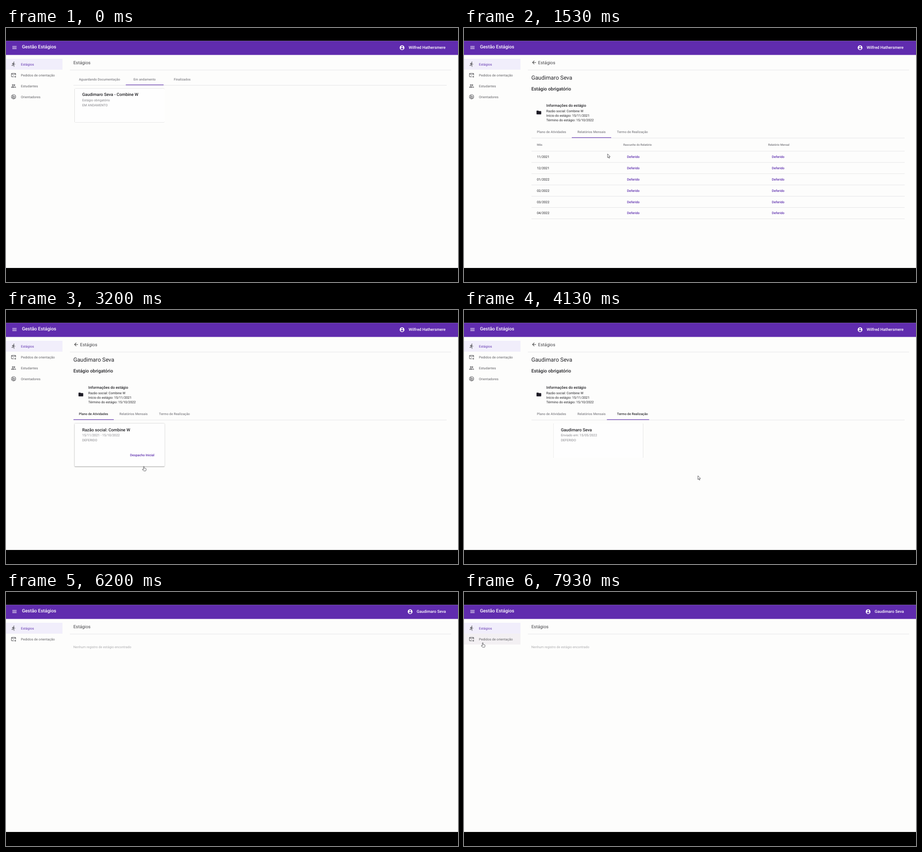
An HTML page that plays this animation: 998x561 px, repeating every 8 s.

```html
<!DOCTYPE html>
<html lang="pt">
<head>
<meta charset="utf-8">
<title>Gestão Estágios</title>
<style>
html, body { margin: 0; width: 100%; height: 100%; overflow: hidden; background: #000; }
svg { display: block; width: 100vw; height: 100vh; }
text { font-family: Roboto, sans-serif; text-rendering: geometricPrecision; white-space: pre; }
.card { fill: #fefefe; filter: drop-shadow(0 .7px .4px rgba(0,0,0,.34)) drop-shadow(0 .3px .7px rgba(0,0,0,.14)); }
.card.hover { filter: drop-shadow(0 1px .7px rgba(0,0,0,.28)) drop-shadow(0 .5px 1.6px rgba(0,0,0,.24)); }
</style>
</head>
<body>
<svg id="stage" viewBox="0 0 998 561" preserveAspectRatio="none"></svg>
<script>
const PURPLE = '#5e2fae', DARK = '#222226', GREY = '#85858a', LINE = '#dfdfe2';
const STUDENT = 'Gaudimaro Seva', COMPANY = 'Combine W';
const LEFT = 149, WIDTH = 824;

const icons = {
  menu: 'M3 18h18v-2H3v2zm0-5h18v-2H3v2zm0-7v2h18V6H3z',
  user: 'M12 2C6.48 2 2 6.48 2 12s4.48 10 10 10 10-4.48 10-10S17.52 2 12 2zm0 3c1.66 0 3 1.34 3 3s-1.34 3-3 3-3-1.34-3-3 1.34-3 3-3zm0 14.2c-2.5 0-4.71-1.28-6-3.22.03-1.99 4-3.08 6-3.08 1.99 0 5.97 1.09 6 3.08-1.29 1.94-3.5 3.22-6 3.22z',
  run: 'M13.49 5.48c1.1 0 2-.9 2-2s-.9-2-2-2-2 .9-2 2 .9 2 2 2zm-3.6 13.9l1-4.4 2.1 2v6h2v-7.5l-2.1-2 .6-3c1.3 1.5 3.3 2.5 5.5 2.5v-2c-1.9 0-3.5-1-4.3-2.4l-1-1.6c-.4-.6-1-1-1.7-1-.3 0-.5.1-.8.1l-5.2 2.2v4.7h2v-3.4l1.8-.7-1.6 8.1-4.9-1-.4 2 7 1.4z',
  inbox: 'M20 4H4c-1.1 0-2 .9-2 2v12c0 1.1.9 2 2 2h9v-2H4V8l8 5 8-5v5h2V6c0-1.1-.9-2-2-2zm-8 7L4 6h16l-8 5zm7 4l4 4-4 4v-3h-4v-2h4v-3z',
  people: 'M9 13.75c-2.34 0-7 1.17-7 3.5V19h14v-1.75c0-2.33-4.66-3.5-7-3.5zM4.34 17c.84-.58 2.87-1.25 4.66-1.25s3.82.67 4.66 1.25H4.34zM9 12c1.93 0 3.5-1.57 3.5-3.5S10.93 5 9 5 5.5 6.57 5.5 8.5 7.07 12 9 12zm0-5c.83 0 1.5.67 1.5 1.5S9.83 10 9 10s-1.5-.67-1.5-1.5S8.17 7 9 7zm7.04 6.81c1.16.84 1.96 1.96 1.96 3.44V19h4v-1.75c0-2.02-3.5-3.17-5.96-3.44zM15 12c1.93 0 3.5-1.57 3.5-3.5S16.93 5 15 5c-.54 0-1.04.13-1.5.35.63.89 1 1.98 1 3.15s-.37 2.26-1 3.15c.46.22.96.35 1.5.35z',
  back: 'M20 11H7.83l5.59-5.59L12 4l-8 8 8 8 1.41-1.41L7.83 13H20v-2z',
  folder: 'M10 4H4c-1.1 0-2 .9-2 2v12c0 1.1.9 2 2 2h16c1.1 0 2-.9 2-2V8c0-1.1-.9-2-2-2h-8l-2-2z'
};

const text = (x, y, s, { size = 7.28, fill = DARK, bold = false, more = '' } = {}) =>
  `<text x="${x}" y="${y}" font-size="${size}" fill="${fill}" font-weight="${bold ? 500 : 400}" ${more}>${s}</text>`;
const rect = (x, y, w, h, fill, more = '') =>
  `<rect x="${x}" y="${y}" width="${w}" height="${h}" fill="${fill}" ${more}/>`;
const rule = (y, x = LEFT, w = WIDTH) => rect(x, y - .4, w, .8, LINE);
const icon = (name, cx, cy, fill) =>
  `<path d="${icons[name]}" fill="${fill}" transform="translate(${cx - 6.24} ${cy - 6.24}) scale(.52)"/>`;
const group = (id, body, more = '') => `<g id="${id}" ${more}>${body}</g>`;
const tab = (x, y, s, id) => text(x, y, s, { bold: true, fill: GREY, more: `id="${id}"` });
const card = (id, y, h, title, lines) =>
  `<rect id="${id}" class="card" x="151.5" y="${y}" width="198.5" height="${h}" rx="1.5"/>` +
  text(168.2, y + 16.7, title, { size: 9.36, bold: true }) +
  lines.map((s, i) => text(168.2, y + 28.4 + i * 10.4, s, { fill: GREY })).join('');
const sideItem = (i, s, on) =>
  text(33, 82.6 + 24 * i, s, { fill: on ? PURPLE : '#5c5c60', more: 'letter-spacing=".12"' });
const heading = (x, s) => text(x, 79.6, s, { size: 9.9, fill: '#444448' });
const account = (id, x, name) =>
  group(id, icon('user', x - 14.5, 43.5, '#fff') + text(x, 46, name, { size: 8.8, fill: '#fff', bold: true }));

const supervisor = `<g transform="translate(10.5 145.6) scale(.52)" fill="none" stroke="#5c5c60" stroke-width="2">
  <circle cx="12" cy="12" r="9.2"/><circle cx="9.6" cy="9.6" r="2.4"/>
  <path d="M4.6 16.6q5-3.6 8.2-1.2M12 21v-3.4q2.4-2.6 6.6-1"/><circle cx="16" cy="11.2" r="1.2"/></g>`;

const months = ['11/2021', '12/2021', '01/2022', '02/2022', '03/2022', '04/2022'];
const th = (x, s) => text(x, 260, s, { size: 6.24, fill: '#77777c', bold: true });
const table = th(161, 'Mês') + th(351.7, 'Rascunho do Relatório') + th(671.5, 'Relatório Mensal') + rule(272) +
  months.map((m, i) => {
    const y = 286.8 + 24.93 * i, link = x => text(x, y, 'Deferido', { fill: PURPLE, bold: true });
    return text(161, y, m) + link(360) + link(679.8) + rule(296.9 + 24.93 * i);
  }).join('');

const stage = document.getElementById('stage');
stage.innerHTML = `<defs>
  <clipPath id="panelClip"><rect x="${LEFT}" y="243.6" width="${WIDTH}" height="286"/></clipPath>
  <clipPath id="tabClip"><rect id="tabBox" y="218" height="25"/></clipPath>
  <clipPath id="pageClip"><rect y="28.5" width="998" height="501.5"/></clipPath></defs>` +
  rect(0, 0, 998, 561, '#000') + rect(0, 28.5, 998, 501.5, '#fdfdfc') +
  rect(0, 28.5, 998, 31, '#602cae') + icon('menu', 18.7, 43.2, '#fff') +
  text(35.2, 45.4, 'Gestão Estágios', { size: 10.4, fill: '#fff', bold: true }) +
  account('tutor', 889, 'Wilfred Hathersmere') + account('student', 906.8, STUDENT) +
  rect(0, 68, 124.7, 24, '#f1eefb') + rect(0, 92, 124.7, 24, '#f3f0f3', 'id="rowHover"') +
  icon('run', 16.7, 80, '#5c5c60') + sideItem(0, 'Estágios', true) +
  icon('inbox', 16.7, 104, '#5c5c60') + sideItem(1, 'Pedidos de orientação') +
  group('tutorMenu', icon('people', 16.7, 128, '#5c5c60') + sideItem(2, 'Estudantes') +
    supervisor + sideItem(3, 'Orientadores')) +
  rule(92.9, 141, 842) +
  group('list', heading(148.7, 'Estágios') +
    tab(161, 115.9, 'Aguardando Documentação', 'l0') + tab(281.4, 115.9, 'Em andamento', 'l1') +
    tab(370.4, 115.9, 'Finalizados', 'l2') + rule(126.4) + rect(264.5, 125, 83.5, 1.2, PURPLE) +
    card('listCard', 133.7, 74.5, `${STUDENT} - ${COMPANY}`, ['Estágio obrigatório', 'EM ANDAMENTO'])) +
  group('detail', icon('back', 154.8, 76.2, '#333') + heading(163.6, 'Estágios') +
    text(148.7, 114, STUDENT, { size: 12.4 }) +
    text(148.7, 138.1, 'Estágio obrigatório', { size: 10.3, bold: true }) +
    icon('folder', 165.3, 186.6, '#1c1a24') +
    text(181.8, 173.5, 'Informações do estágio', { size: 8.28, bold: true }) +
    ['Razão social: ' + COMPANY, 'Início do estágio: 15/11/2021', 'Término do estágio: 15/10/2022']
      .map((s, i) => text(181.8, 185.7 + 10.3 * i, s)).join('') +
    group('ripple', '<circle id="wave"/>', 'clip-path="url(#tabClip)"') +
    tab(161, 232.3, 'Plano de Atividades', 'd0') + tab(250.4, 232.3, 'Relatórios Mensais', 'd1') +
    tab(337.8, 232.3, 'Termo de Realização', 'd2') + rule(243) +
    rect(0, 241.5, 0, 1.2, PURPLE, 'id="ink"') +
    `<g clip-path="url(#panelClip)">` +
    group('p0', card('planCard', 251, 94.5, 'Razão social: ' + COMPANY, ['15/11/2021 - 15/10/2022', 'DEFERIDO']) +
      text(274, 323.2, 'Despacho Inicial', { fill: PURPLE, bold: true })) +
    group('p1', table) +
    group('p2', card('termCard', 251, 75, STUDENT, ['Enviado em: 15/05/2022', 'DEFERIDO'])) + '</g>') +
  group('empty', heading(148.7, 'Estágios') +
    text(148.7, 124.2, 'Nenhum registro de estágio encontrado', { fill: '#adadaf' })) +
  `<g clip-path="url(#pageClip)"><g id="cursor" fill="#fff" stroke="#2c2c30" stroke-width=".75" stroke-linejoin="round">
    <path id="arrow" d="M0 0V8.4L1.9 6.7 3.2 9.7 4.5 9.1 3.2 6.2H5.8Z"/>
    <path id="hand" d="M-1 .8a.9.9 0 0 1 1.8 0V4l3.4.7q.9.3.8 1.2l-.5 3.2q-.2 1-1 1H0q-.6 0-1-.5L-3.6 6.7q.4-.9 1.6-.4L-1 7z"/>
  </g></g>`;

const el = id => document.getElementById(id);
const set = (id, attrs) => { for (const k in attrs) el(id).setAttribute(k, attrs[k]); };
const show = (id, on) => set(id, { display: on ? 'inline' : 'none' });
const clamp = v => Math.max(0, Math.min(1, v));

function bezier(x1, y1, x2, y2) {
  const at = (a, b, u) => 3 * u * (1 - u) * (1 - u) * a + 3 * u * u * (1 - u) * b + u * u * u;
  return x => {
    if (x <= 0 || x >= 1) return clamp(x);
    let lo = 0, hi = 1;
    for (let i = 0; i < 24; i++) {
      const mid = (lo + hi) / 2;
      if (at(x1, x2, mid) < x) lo = mid; else hi = mid;
    }
    return at(y1, y2, lo);
  };
}
const slide = bezier(.35, 0, .25, 1), spread = bezier(0, 0, .2, 1);

const LOOP = 8000, STEP = 1000 / 15;
const OPEN = 1070, SWITCH = 5730;
const tabs = [[149, 89], [238, 87], [325.3, 93.5]];
const clicks = [
  { from: 1, to: 0, at: 2670, x: 210.5, y: 235 },
  { from: 0, to: 2, at: 3770, x: 373, y: 235 }
];
const path = [
  [460, 1000, 300], [930, 332, 190], [1090, 326, 196], [1530, 317, 278], [2130, 300, 284],
  [2530, 212, 238], [2730, 210.5, 235], [3200, 304.5, 345.4], [3670, 372, 234], [3800, 374, 236],
  [4130, 516.5, 366], [4800, 560, 380], [5400, 1002, 330],
  [6530, 330, 532], [7330, 62, 160], [7930, 41.5, 112], [8000, 41.5, 112]
];

function pointer(t) {
  if (t < 460 || (t > 5400 && t < 6530)) return null;
  const i = path.findIndex(k => k[0] >= t) || 1;
  const [t0, x0, y0] = path[i - 1], [t1, x1, y1] = path[i];
  const u = clamp((t - t0) / (t1 - t0)), e = u * u * (3 - 2 * u);
  return { x: x0 + (x1 - x0) * e, y: y0 + (y1 - y0) * e };
}

function drawTabs(t, over) {
  const click = clicks.filter(c => t >= c.at).pop();
  const active = click ? click.to : 1;
  const from = click ? click.from : 1;
  const e = click ? slide((t - click.at) / 500) : 1;
  const mix = k => tabs[from][k] + (tabs[active][k] - tabs[from][k]) * e;
  const dir = Math.sign(active - from);
  set('ink', { x: mix(0), width: mix(1) });
  tabs.forEach(([x, w], i) => {
    const moving = i === from && e < 1;
    show('p' + i, i === active || moving);
    set('p' + i, { transform: `translate(${i === active ? dir * WIDTH * (1 - e) : -dir * WIDTH * e} 0)` });
    const hovered = over(x, 218, w, 25);
    set('d' + i, { fill: hovered || (click && i === active) ? '#2e2e32' : GREY });
  });
  const press = clicks.find(c => t >= c.at - 70 && t < c.at + 230);
  show('ripple', press);
  if (press) {
    const [x, w] = tabs[press.to], reach = Math.hypot(Math.max(press.x - x, x + w - press.x), 17);
    set('tabBox', { x, width: w });
    set('wave', {
      cx: press.x, cy: press.y, r: reach * spread((t - press.at + 70) / 225),
      'fill-opacity': .12 * (1 - clamp((t - press.at - 70) / 160))
    });
  }
}

function draw(ms) {
  const t = Math.floor((ms % LOOP + 5) / STEP) * STEP;
  const page = t < OPEN ? 'list' : t < SWITCH ? 'detail' : 'empty';
  const p = pointer(t);
  const over = (x, y, w, h) => !!p && p.x >= x && p.x < x + w && p.y >= y && p.y < y + h;
  for (const id of ['list', 'detail', 'empty']) show(id, id === page);
  for (const id of ['tutor', 'tutorMenu']) show(id, page !== 'empty');
  show('student', page === 'empty');
  if (page === 'detail') drawTabs(t, over);

  const onRow = over(0, 92, 124.7, 24);
  const onList = page === 'list' && over(151.5, 134, 198.5, 75);
  const onPlan = page === 'detail' && t > 2900 && t < clicks[1].at && over(151.5, 251, 199, 95);
  const onTab = page === 'detail' && over(LEFT, 218, 270, 25);
  show('rowHover', onRow);
  set('listCard', { class: onList ? 'card hover' : 'card' });
  set('planCard', { class: onPlan ? 'card hover' : 'card' });

  show('cursor', p);
  if (!p) return;
  const hand = onRow || onList || onPlan || onTab;
  set('cursor', { transform: `translate(${p.x} ${p.y})` });
  show('hand', hand);
  show('arrow', !hand);
}

const start = performance.now();
function tick() {
  draw(performance.now() - start);
  requestAnimationFrame(tick);
}
tick();
</script>
</body>
</html>
```
